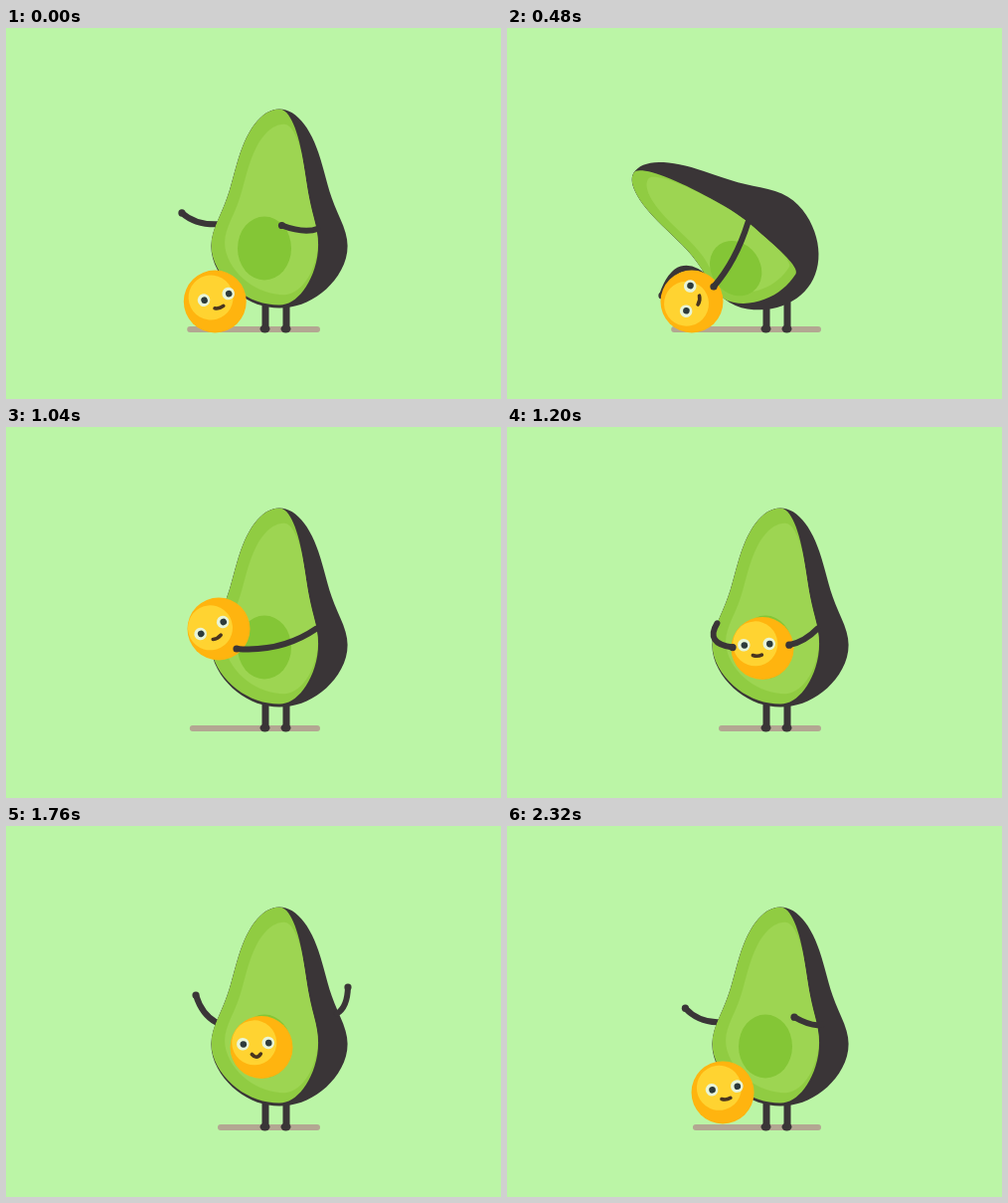
An HTML page with a canvas for the animation above (2.4 s loop, 498 by 373 pixels).

```html
<!DOCTYPE html>
<html lang="en">
<head>
<meta charset="utf-8">
<title>Avocado and its stone</title>
<style>
html, body { margin: 0; width: 100%; height: 100%; overflow: hidden; background: #bbf5a6; }
canvas { display: block; width: 100vw; height: 100vh; }
</style>
</head>
<body>
<canvas id="stage" width="498" height="373"></canvas>
<script>
const g = document.getElementById('stage').getContext('2d');
const LOOP = 2400, STEP = 80, RAD = Math.PI / 180;
const LEAD = 440; // the story begins when the stone drops out, this long before the loop wraps
const INK = '#3a3537', SEAT = [257, 222.5], GROUND = 275;

const clamp = v => Math.max(0, Math.min(1, v));
const mix = (a, b, k) => a + (b - a) * k;
const blend = (p, q, k) => [mix(p[0], q[0], k), mix(p[1], q[1], k)];
const add = (p, q) => [p[0] + q[0], p[1] + q[1]];

function ramp(t, from, to) {
  const u = clamp((t - from) / (to - from));
  return u * u * (3 - 2 * u);
}

function stone(t, lift, settle) {
  const roll = 1 - (1 - clamp(t / 1100)) ** 2;
  const x = mix(SEAT[0], 184, roll);
  const hop = Math.max(0, 1 - ((t - 320) / 120) ** 2);
  const y = t < 200 ? mix(SEAT[1], GROUND, (t / 200) ** 2) : GROUND - 8 * hop - 5 * ramp(t, 1000, 1160);
  const at = blend(blend([x, y], [214, 203], lift), SEAT, settle);
  const angle = mix(mix(-90 * roll ** 4, -28, lift), -3, settle);
  return { at, angle, shift: 8 * Math.min(1, roll * 2) * (1 - lift) };
}

// Pear-shaped body: sideways x and downward y around its middle
function makeBody(lean, sway) {
  const a = 58 * RAD * lean, cos = Math.cos(a), sin = Math.sin(a);
  const mid = [275 - 69 * sin, 181.5 + 42 * (1 - cos)];

  function place(x, y) {
    const px = mid[0] + x * cos + y * sin, py = mid[1] - x * sin + y * cos;
    return [px + sway * clamp(0.3 + 0.7 * (py - 82) / 130), py];
  }
  function rim(th, flesh) {
    const c = Math.cos(th), s = Math.sin(th), neck = Math.tanh(3 * c + 0.45);
    let x = (64 - 17 * neck) * s * (1 - 0.1 * lean);
    let y = -(100 + 5 * lean) * c;
    if (s < 0) x *= 1 - 0.1 * lean * (1 + neck);
    else if (flesh) x *= 0.57 - lean * (0.11 + 0.12 * (1 - neck));
    if (flesh && c < 0) y *= 0.97 - 0.14 * lean;
    return place(x, y);
  }
  const outline = flesh => Array.from({ length: 90 }, (_, i) => rim(i * 4 * RAD, flesh));
  return { a, place, rim, outline };
}

function fillShape(pts, color) {
  g.beginPath();
  pts.forEach(p => g.lineTo(...p));
  g.closePath();
  g.fillStyle = color;
  g.fill();
}

function disc(x, y, rx, color, ry = rx, rot = 0) {
  g.beginPath();
  g.ellipse(x, y, rx, ry, rot, 0, 7);
  g.fillStyle = color;
  g.fill();
}

function curve(width, color, from, bend, to) {
  g.beginPath();
  g.moveTo(...from);
  g.quadraticCurveTo(...bend, ...to);
  g.lineWidth = width;
  g.strokeStyle = color;
  g.stroke();
}

function arm(shoulder, hand, sag) {
  curve(6, INK, shoulder, add(blend(shoulder, hand, 0.5), sag), hand);
  disc(...hand, 3.6, INK);
}

function legs(sway) {
  for (const x of [261, 282]) {
    curve(7, INK, [x + sway * 0.6, 272], [x + sway * 0.4, 286], [x - sway * 0.1, 302]);
    disc(x - 0.5 - sway * 0.1, 302.5, 5, INK, 4);
  }
}

function drawBody(body, lean) {
  const flesh = body.outline(true), seam = body.rim(1.75, true);
  fillShape(body.outline(false), INK);
  g.save();
  g.clip();
  fillShape(flesh, '#90cc42');
  g.clip();
  fillShape(flesh.map(p => blend(seam, p, 0.87)), '#9dd552');
  const fit = 1 - 0.09 * lean;
  disc(...body.place(-15 - 12 * lean, 40 - 7 * lean), 27 * fit, '#84c636', 32 * fit, -body.a * 0.6);
  g.restore();
}

function drawStone({ at, angle, shift }, smile) {
  g.save();
  g.translate(...at);
  disc(0, 0, 31.5, '#ffb40f');
  g.clip();
  g.rotate(angle * RAD);
  disc(shift / 2 - 7, -5, 22.5, '#ffd331');
  g.translate(shift, 0);
  for (const x of [-18.5, 7]) {
    disc(x, -4.2, 6.3, '#e8f5d8');
    disc(x + 0.5, -4, 3.3, '#2d3b3b');
  }
  curve(3.6, '#49351f', [-10, 6.5], [-5.5, 7.5 + 5 * smile], [-1, 6.5]);
  g.restore();
}

function draw(t) {
  const rest = ramp(t, 0, 520), reach = ramp(t, 440, 900);
  const lift = ramp(t, 1180, 1480), settle = ramp(t, 1480, 1640);
  const hips = ramp(t, 1480, 1720), cheer = ramp(t, 2000, 2180);
  const lean = ramp(t, 440, 870) - lift;
  const sway = 13 * (ramp(t, 1640, 1840) - ramp(t, 1920, 2080));
  const body = makeBody(lean, sway), ball = stone(t, lift, settle);
  ball.at[0] += sway;

  // Each hand passes through raised, resting, gripping, on the hip, raised again
  const hand = (up, low, grip, hold, hip) => {
    const onBall = add(ball.at, blend(grip, hold, lift));
    const p = blend(blend(up, low, rest), onBall, reach);
    return blend(blend(p, [hip[0] + sway, hip[1]], hips), up, cheer);
  };
  const left = hand([191, 170], [176, 187], [-30, -6], [-7, 12], [219, 217]);
  const right = hand([344, 162], [273, 201], [22, -15], [18, 20], [287, 211]);
  const raised = Math.max(cheer, 1 - rest), onHip = hips * (1 - cheer), grip = reach * (1 - lift);
  const rightShoulder = blend(body.rim(1.79, true), body.place(58, 7), raised);
  const leftArm = () => arm(body.rim(-1.73), left, [-4 - 22 * onHip - 4 * grip, 6 + 3 * onHip - 44 * grip]);
  const inFront = t > 1600 && t < 2060;

  g.lineCap = 'round';
  g.fillStyle = '#bbf5a6';
  g.fillRect(0, 0, 498, 373);
  const edge = Math.min(213, ball.at[0] * 0.7 + 35);
  curve(6, '#b3a792', [edge + 3, 303], [260, 303], [313, 303]);
  legs(sway);
  if (!inFront) leftArm();
  drawBody(body, lean);
  drawStone(ball, 0.2 + 0.8 * Math.max(ramp(t, 1960, 2160), 1 - ramp(t, 0, 120)));
  if (inFront) leftArm();
  arm(rightShoulder, right, [5 - 5 * onHip, 7 + 7 * lift * (1 - hips) - 5 * onHip]);
}

const start = performance.now();
function tick() {
  const t = (performance.now() - start) % LOOP;
  draw((Math.floor(t / STEP) * STEP + LEAD) % LOOP);
  requestAnimationFrame(tick);
}
tick();
</script>
</body>
</html>
```
